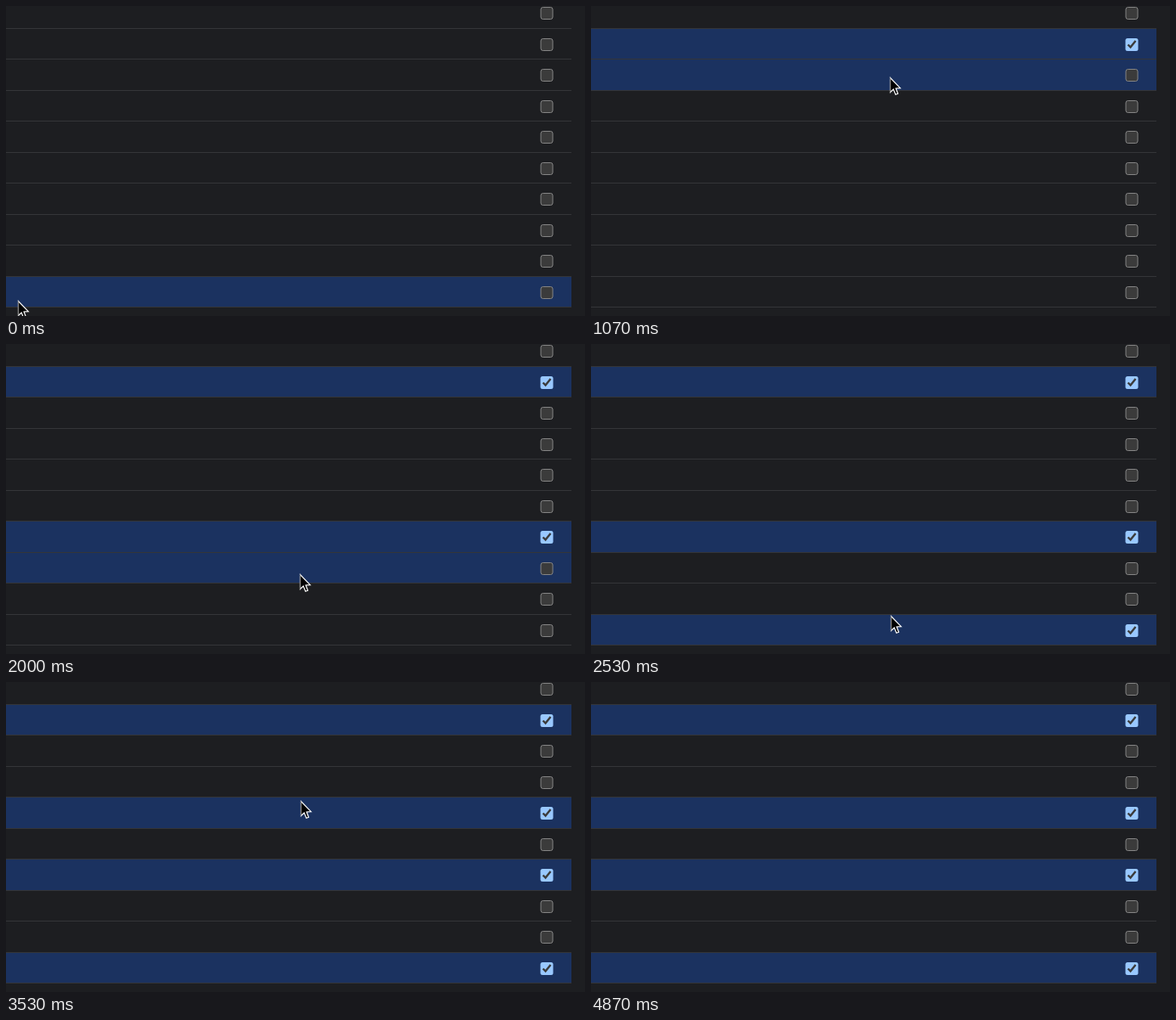
An HTML page with a canvas that plays this animation: 682x365 px, repeating every 5 s.

```html
<!DOCTYPE html>
<html lang="en">
<head>
<meta charset="utf-8">
<title>Checkbox list</title>
<style>
  html, body { margin: 0; width: 100%; height: 100%; overflow: hidden; background: #1d1e21; }
  canvas { display: block; }
</style>
</head>
<body>
<canvas id="stage" width="682" height="365"></canvas>
<script>
const ctx = document.getElementById("stage").getContext("2d");
const LOOP = 5000, HIDE = 4870;
const WIDTH = 666, PITCH = 36.5, BOX = 15;

// Time at which each row gets ticked
const ticks = { 1: 870, 6: 1870, 9: 2530, 4: 3530 };

// Eased pointer moves; "via" bends the path
const home = { x: 14, y: 348 };
const moves = [
  { from: 0, to: 530, x: 357, y: 44, via: { x: -30, y: 237 } },
  { from: 530, to: 730, x: 363, y: 40 },
  { from: 870, to: 1330, x: 346, y: 213, via: { x: 346, y: 75 } },
  { from: 1330, to: 1670, x: 342, y: 246 },
  { from: 1870, to: 2200, x: 353, y: 321 },
  { from: 2600, to: 3130, x: 347, y: 141 },
  { from: 3600, to: 4130, x: 347, y: 358 },
  { from: 4730, to: HIDE, x: 347, y: 365 }
];

const lineY = i => Math.floor(26 + PITCH * (i - 1));
const ease = u => u * u * (3 - 2 * u);
const mix = (a, b, s) => ({ x: a.x + (b.x - a.x) * s, y: a.y + (b.y - a.y) * s });

function pointerAt(t) {
  let pos = home;
  for (const m of moves) {
    if (t <= m.from) break;
    const s = ease(Math.min(1, (t - m.from) / (m.to - m.from)));
    const via = m.via || mix(pos, m, 0.5);
    pos = mix(mix(pos, via, s), mix(via, m, s), s);
  }
  return pos;
}

function trace(points) {
  ctx.beginPath();
  points.forEach(([x, y]) => ctx.lineTo(x, y));
}

function stroke(color, width) {
  ctx.strokeStyle = color;
  ctx.lineWidth = width;
  ctx.stroke();
}

function drawBox(y, on) {
  ctx.save();
  ctx.translate(629.5, y);
  ctx.beginPath();
  if (on) {
    ctx.roundRect(0, 0, BOX, BOX, 2.5);
    ctx.fillStyle = "#99c8ff";
    ctx.fill();
    trace([[0.2, 0.5], [0.4, 0.7], [0.8, 0.2]].map(p => p.map(v => v * BOX)));
    stroke("#3b3b3b", BOX * 0.16);
  } else {
    ctx.roundRect(0.5, 0.5, BOX - 1, BOX - 1, 2.5);
    ctx.fillStyle = "#3b3b3b";
    ctx.fill();
    stroke("#858585", 1);
  }
  ctx.restore();
}

function drawPointer({ x, y }) {
  ctx.save();
  ctx.translate(Math.round(x) + 0.5, Math.round(y) - 0.5);
  trace([[0, 0], [0, 17], [3.7, 13.5], [6.3, 19.8], [9, 18.7], [6.6, 12.5], [11.8, 12.2]]);
  ctx.closePath();
  ctx.fillStyle = "#000";
  ctx.fill();
  stroke("#fff", 1.2);
  trace([[0, 0], [0, 17]]);
  stroke("#858585", 1);
  ctx.restore();
}

function draw(t) {
  const shown = t < HIDE;
  const pointer = pointerAt(t);
  const hover = pointer.y - 2;

  ctx.fillStyle = "#1d1e21";
  ctx.fillRect(0, 0, 682, 365);

  for (let i = 0; i <= 10; i++) {
    const top = lineY(i) + 1, bottom = lineY(i + 1);
    const on = t >= ticks[i];
    if (on || shown && hover >= top - 1 && hover < bottom) {
      ctx.fillStyle = "#1b3260";
      ctx.fillRect(0, top, WIDTH, bottom - top);
    }
    ctx.fillStyle = "#343538";
    ctx.fillRect(0, top - 1, WIDTH, 1);
    if (i < 10) drawBox(top + 11, on);
  }
  if (shown) drawPointer(pointer);
}

const start = performance.now();

// The picture advances 15 times a second
function tick() {
  const t = (performance.now() - start) % LOOP;
  const step = Math.floor((t + 3.4) * 0.015);
  draw(Math.round(step / 0.15) * 10 % LOOP);
  requestAnimationFrame(tick);
}
tick();
</script>
</body>
</html>
```
